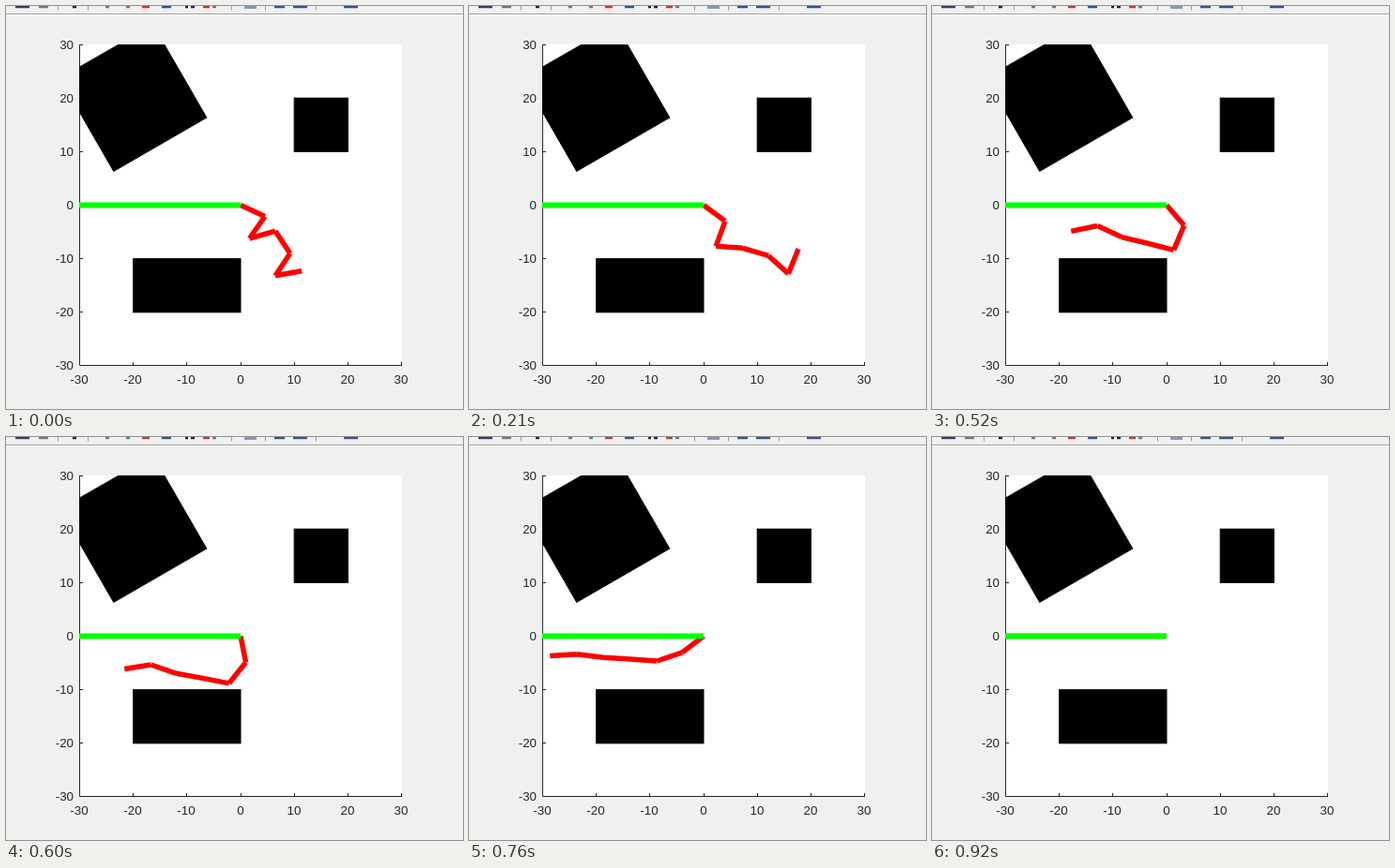
Write an HTML page that moves like this. It is 487 by 430 pixels and loops after 1.62 s.

```html
<!DOCTYPE html>
<html lang="en">
<head>
<meta charset="utf-8">
<title>Robot arm path</title>
<style>
  html, body { margin: 0; width: 100%; height: 100%; overflow: hidden; background: #f0f0f0; }
  svg { display: block; width: 487px; height: 430px; }
  text { font: 13.33px "Liberation Sans", Arial, sans-serif; fill: #262626; }
</style>
</head>
<body>
<svg viewBox="0 0 487 430">
  <defs><clipPath id="box"><rect x="78" y="41" width="344" height="343"/></clipPath></defs>
  <!-- lower edges of the toolbar icons -->
  <g fill="none" stroke-width="2.5">
    <path d="M10 1h15" stroke="#4a3560"/>
    <path d="M35 1h10m61 0h4m18 0h4m88 0h4" stroke="#777"/>
    <path d="M71 1h4m116 0h3m3 0h4" stroke="#223"/>
    <path d="M145 1h8m57 0h7" stroke="#c33"/>
    <path d="M166 1h10m110 0h11m9 0h15m39 0h15" stroke="#34528c"/>
    <path d="M254 1h13" stroke="#8a98b0" stroke-width="4"/>
    <path d="M55 2h1m31 0h1m152 0h1m35 0h1m53 0h1" stroke="#999" stroke-width="5"/>
  </g>
  <path d="M0 8.5H487" stroke="#a0a0a0"/>
  <path d="M0 9.5H487" stroke="#fff"/>
  <rect x="78" y="41" width="344" height="343" fill="#fff"/>
  <g id="axes"></g>
  <g id="blocks" clip-path="url(#box)" stroke="#000"></g>
  <path id="arm" fill="none" stroke="#f00" stroke-width="5.5"/>
  <rect x="78" y="209.5" width="172" height="6" fill="#0f0"/>
</svg>
<script>
const $ = id => document.getElementById(id);
const UNIT = 343 / 60, LINK = 5 * UNIT, LOOP = 1620;
const px = x => 250 + x * UNIT;
const py = y => 212.5 - y * UNIT;

let axes = '<path d="M78.5 41V383.5H422" fill="none" stroke="#262626"/>';
for (let v = -30; v <= 30; v += 10) {
  const x = Math.floor(px(v)) + 0.5;
  const y = Math.min(383, Math.floor(py(v))) + 0.5;
  axes += `<path d="M${x} 383v-3M79 ${y}h3" stroke="#262626"/>` +
    `<text x="${x - 0.5}" y="403" text-anchor="middle">${v}</text>` +
    `<text x="72" y="${y + 4.5}" text-anchor="end">${v}</text>`;
}
$('axes').innerHTML = axes;

const rect = (x, y, w, h, turn = 0) =>
  `<rect x="${px(x)}" y="${py(y)}" width="${w * UNIT}" height="${h * UNIT}" ` +
  `transform="rotate(${turn} ${px(x + w / 2)} ${py(y - h / 2)})"/>`;
$('blocks').innerHTML = rect(-30, 30, 20, 20, -30) + rect(10, 20, 10, 10) + rect(-20, -10, 20, 10);

// Waypoints of the arm: the bend of each joint in degrees
const path = [
  { at: 0, bends: [-25, -100, 141, -72.5, -67, 133.5] },
  { at: 3, bends: [-36.5, -73.5, 106, -12.5, -25.5, 110] },
  { at: 5, bends: [-43, -67, 182, 2.5, -21, 74.5] },
  { at: 7, bends: [-49, -64, 278.5, 1, -11.5, 37] },
  { at: 9, bends: [-108.5, -36, 317, 0.5, -6, 19] },
  { at: 11.1, bends: [-180, 0, 360, 0, 0, 0] }
];

function bendsAt(step) {
  const i = path.findIndex(p => p.at > step);
  if (i < 0) return path[path.length - 1].bends;
  const a = path[i - 1], b = path[i];
  const f = (step - a.at) / (b.at - a.at);
  return a.bends.map((v, j) => v + (b.bends[j] - v) * f);
}

function armPath(step) {
  let x = px(0), y = py(0), heading = 0, d = '';
  for (const bend of bendsAt(step)) {
    heading += bend * Math.PI / 180;
    d += `M${x} ${y}`;
    x += LINK * Math.cos(heading);
    y -= LINK * Math.sin(heading);
    d += `L${x} ${y}`;
  }
  return d;
}

// Steps last 70 ms at first, then 80 ms
const stepAt = t => Math.min(12, Math.floor(Math.min(t / 70, (t + 40) / 80)));

const t0 = performance.now();
function draw() {
  const t = (performance.now() - t0) % LOOP;
  $('arm').setAttribute('d', armPath(stepAt(t)));
  requestAnimationFrame(draw);
}
draw();
</script>
</body>
</html>
```
